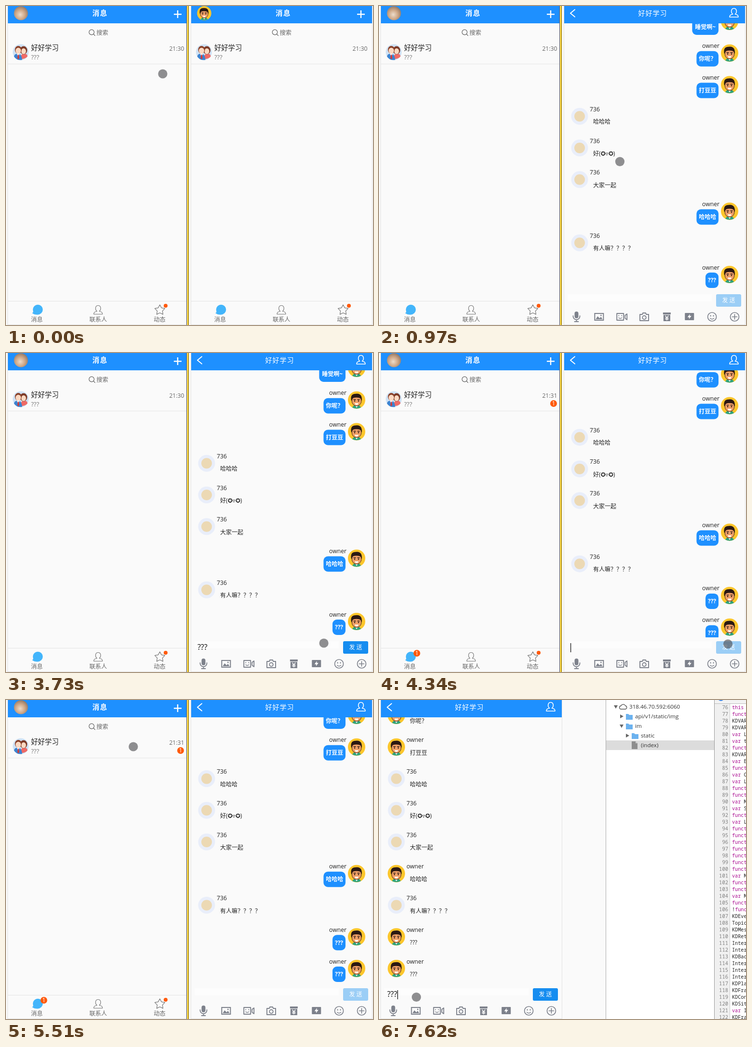
These frames come from a looping animation (761 by 663 pixels, 8 s). An HTML page:

```html
<!DOCTYPE html>
<html lang="zh-CN">
<head>
<meta charset="utf-8">
<title>Chat demo</title>
<style>
html, body { margin: 0; width: 100%; height: 100%; overflow: hidden; background: #fafafa; }
svg { display: block; width: 100vw; height: 100vh; }
text { font-family: 'Open Sans', 'Noto Sans CJK SC', 'Noto Sans CJK', 'DejaVu Sans', sans-serif; white-space: pre; }
.code text { font-family: 'Noto Sans Mono', 'DejaVu Sans Mono', monospace; }
</style>
</head>
<body>
<svg id="stage" viewBox="0 0 761 663"></svg>
<script>
const LOOP = 8000, STEP = 65.75, BLUE = '#1e90ff', GREY = '#7d818b', ALERT = '#ff5a0c';
const $ = id => document.getElementById(id);

// Markup helpers
const text = (x, y, s, size, fill, extra = '') =>
  `<text x="${x}" y="${y}" font-size="${size}" fill="${fill}" ${extra}>${s}</text>`;
const rect = (x, y, w, h, fill, extra = '') =>
  `<rect x="${x}" y="${y}" width="${w}" height="${h}" fill="${fill}" ${extra}/>`;
const disc = (x, y, r, fill, extra = '') => `<circle cx="${x}" cy="${y}" r="${r}" fill="${fill}" ${extra}/>`;
const line = (d, stroke, width = 1, fill = 'none') =>
  `<path d="${d}" stroke="${stroke}" stroke-width="${width}" fill="${fill}" stroke-linecap="round" stroke-linejoin="round"/>`;
const fill = (d, color) => `<path d="${d}" fill="${color}"/>`;
const group = (inner, x = 0, y = 0, extra = '') => `<g transform="translate(${x} ${y})" ${extra}>${inner}</g>`;
const put = (id, x, y, k = 1) => `<use href="#${id}" transform="translate(${x} ${y}) scale(${k})"/>`;
const MID = 'text-anchor="middle"', END = 'text-anchor="end"';

const man = disc(0, 0, 18, '#fdc62c')
  + fill('M-9 15.5Q-6 10 0 10Q6 10 9 15.5Q0 20-9 15.5Z', '#2fa37c')
  + fill('M-4 10L0 16L4 10Z', '#fff')
  + `<ellipse cy="2" rx="9.8" ry="10.3" fill="#f0a068" stroke="#3d2116"/>`
  + fill('M-11 2Q-14-13-2-13Q12-15 11 2L9-3Q2-7-8-4Z', '#2b1913')
  + line('M-6-1h4M2-1h4', '#2b1913', 1.4)
  + disc(-4, 2, 1.3, '#2b1913') + disc(4, 2, 1.3, '#2b1913')
  + fill('M-4 6.5H4Q3 10 0 10T-4 6.5Z', '#fff');

const couple = disc(0, 0, 16.5, '#cfe2f5')
  + fill('M-1 14Q0 3 7 3Q14 3 14 9Q9 15-1 14Z', '#ef6a66')
  + fill('M-14 9Q-13 3-6 3Q2 3 3 16Q-8 18-14 9Z', '#3d83d0')
  + fill('M-8 3H-2L-5 11Z', '#fff') + fill('M-5.8 5h1.8l1 7-2 3-2-3Z', '#d33a35')
  + `<ellipse cx="6" cy="-4" rx="7.5" ry="8.5" fill="#7d3b28"/><ellipse cx="6" cy="-2" rx="5" ry="6" fill="#fcd9c2"/>`
  + `<ellipse cx="-5" cy="-5" rx="7" ry="8" fill="#8a4129"/><ellipse cx="-5" cy="-3" rx="5.5" ry="6.3" fill="#fcd9c2"/>`;

const defs = `<defs>
  <radialGradient id="fur" cx=".45" cy=".6" r=".6"><stop offset="0" stop-color="#ecdccb"/>
  <stop offset=".55" stop-color="#cfa887"/><stop offset="1" stop-color="#937a69"/></radialGradient>
  <clipPath id="view"><rect x="4" y="36" width="375" height="555"/></clipPath>
  <g id="man">${man}</g><g id="couple">${couple}</g>
  <g id="pal">${disc(0, 0, 17.5, '#e9eefa')}${disc(0, 0, 11, '#ecd9b4')}</g>
  <g id="pet">${disc(0, 0, 14.5, 'url(#fur)')}</g></defs>`;

const frame = rect(3.5, -2, 376, 664.5, '#fafafa', 'stroke="#e2e2e2"') + rect(4, 0, 375, 36, BLUE);
const person = (x, y, color, w) => line(
  `M${x - 2.5} ${y + 2}C${x - 7} ${y - 2} ${x - 6} ${y - 10} ${x} ${y - 10}S${x + 7} ${y - 2} ${x + 2.5} ${y + 2}`
  + `C${x + 7} ${y + 3} ${x + 9} ${y + 4} ${x + 9} ${y + 8}H${x - 9}C${x - 9} ${y + 4} ${x - 7} ${y + 3} ${x - 2.5} ${y + 2}`, color, w);

function star(x, y, r) {
  const pts = Array.from({ length: 10 }, (_, i) => {
    const a = i * Math.PI / 5, q = i % 2 ? r * .52 : r;
    return [x + q * Math.sin(a), y - q * Math.cos(a)].map(v => v.toFixed(1)).join(' ');
  });
  return line(`M${pts.join('L')}Z`, '#777', 1.2);
}

function home(id, x, face) {
  const badge = (cx, cy) => disc(cx, cy, 7, ALERT) + text(cx, cy + 4.2, '1', 12, '#fff', MID);
  return group(frame + put(face, 31, 15, face === 'man' ? .82 : 1)
    + text(179, 20, '消息', 14.5, '#fff', 'font-weight="bold" letter-spacing="1.5"')
    + rect(348, 16, 16, 2.4, '#fff') + rect(354.8, 9, 2.4, 16, '#fff')
    + disc(177.5, 54.5, 5.3, 'none', 'stroke="#666" stroke-width="1.2"') + line('M181.5 58.5L184.5 61.5', '#666', 1.2)
    + text(187.5, 59.5, '搜索', 12.3, '#666')
    + put('couple', 30.5, 96) + text(52, 92, '好好学习', 14.3, '#222')
    + text(52, 111, '???', 13, '#777')
    + `<text id="${id}Time" x="369.5" y="93" font-size="12.2" fill="#666" text-anchor="end"></text>`
    + rect(4, 120, 375, 1, '#e5e5e5') + rect(4, 613, 375, 1, '#e3e3e3')
    + disc(66, 631, 10.3, '#43b5fb') + fill('M56 630Q58 637 54 638Q60 643 68 641Z', '#43b5fb')
    + person(191, 632.5, '#777', 1.2) + star(319, 632, 11) + disc(331, 623, 4, ALERT)
    + ['消息', '联系人', '动态'].map((s, i) => text(64 + 127.2 * i, 655.5, s, 12.2, '#666', MID)).join('')
    + `<g id="${id}Badge">${badge(362, 105)}${badge(78.5, 624)}</g>`, x, 0, `id="${id}"`);
}

// Messages: a leading * marks the right phone's own
const messages = ['哈哈', '在干嘛?', '*睡觉啊~', '*你呢？', '*打豆豆', '哈哈哈', '好(✪▿✪)', '大家一起',
  '*哈哈哈', '有人嘛？？？？', '*???', '*???'];
const textWidth = s => [...s].reduce((w, c) => w + ({ '?': 5.8, '~': 9 }[c] || 12), 0);

function message(m, i, mine) {
  const own = m[0] === '*', s = own ? m.slice(1) : m, name = own ? 'owner' : '736';
  const y = 543 + STEP * (i - 10);
  if (own && mine) {
    const w = textWidth(s) + 9.6;
    return put('man', 347, y + 15) + text(326, y + 4.5, name, 12.2, '#222', END)
      + rect(324 - w, y + 11, w, 32, BLUE, 'rx="9"')
      + text(324 - w / 2, y + 31.3, s, 12, '#fff', MID + ' font-weight="bold"');
  }
  return put(own ? 'man' : 'pal', 36, y + 15) + text(57, y + 4.5, name, 12.2, '#222') + text(64, y + 31, s, 12, '#222');
}

const tools = [
  rect(-4, -11, 8, 14, GREY, 'rx="4"') + line('M-7-2v1a7 7 0 0 0 14 0v-1M0 6v4M-4 10h8', GREY, 1.8),
  rect(-9, -7, 18, 14, 'none', `stroke="${GREY}" stroke-width="2"`) + fill('M-7 5L-3-1L1 3L4 0L7 5Z', GREY) + disc(4, -3, 1.4, GREY),
  line('M-10-7H4V7H-10ZM7-3L11-6V6L7 3Z', GREY, 1.9) + line('M-6-3v1M0-3v1M-6 2Q-3 5 0 2', GREY, 1.6),
  line('M-9-5H-4L-3-8H3L4-5H9V8H-9Z', GREY, 1.9) + disc(0, 1.5, 3.8, 'none', `stroke="${GREY}" stroke-width="1.8"`),
  rect(-8, -9, 16, 4, GREY) + rect(-7, -4, 14, 13, GREY) + line('M-3-2L0 2L3-2M0 2V7M-3 2.5H3M-3 5H3', '#fff', 1.3),
  rect(-9.5, -8, 19, 15, GREY, 'rx="1"') + fill('M1-6L-4 1H-.5L-1 5L4-2H.5Z', '#fff'),
  disc(0, 0, 9, 'none', `stroke="${GREY}" stroke-width="1.7"`) + disc(-3, -2, 1.3, GREY) + disc(3, -2, 1.3, GREY) + line('M-4 3Q0 6.5 4 3', GREY, 1.5),
  disc(0, 0, 9, 'none', `stroke="${GREY}" stroke-width="1.7"`) + line('M-5 0H5M0-5V5', GREY, 1.7)
];

function chat(id, x, mine) {
  return group(frame + line('M26 7.5L17 15L26 22.5', '#fff', 2)
    + text(187.5, 20, '好好学习', 14, '#fff', MID + ' letter-spacing="1"') + person(356, 15, '#fff', 1.6)
    + `<g clip-path="url(#view)"><g id="${id}List">${messages.map((m, i) => message(m, i, mine)).join('')}</g></g>`
    + rect(11, 599, 299, 15, '#fdfdfd')
    + `<text id="${id}Input" x="17" y="617" font-size="16" fill="#111"></text>`
    + rect(17, 603, 1.2, 19, '#000', `id="${id}Caret"`)
    + rect(319, 599, 52, 26, '', `rx="3" id="${id}Send"`)
    + text(345, 616.3, '发 送', 12, '#fff', MID)
    + tools.map((s, i) => group(s, 29.5 + 46.85 * i, 646)).join(''), x, 0, `id="${id}"`);
}

function inspector() {
  const rows = ('this,funct,KDVAR,KDVAR,var L,var t,funct,KDVAR,var E,funct,var C,var L,funct,funct,var M,var S,funct,var L,'
    + 'funct,'.repeat(7) + 'var M,funct,funct,var M,funct,!func,KDEve,Topic,KDMes,KDRet,Inter,Inter,KDBac,Inter,Inter,Inter,'
    + 'KDPla,KDFra,KDCon,KDSit,var I,KDFra').split(',');
  const paint = s => s.replace(/this|funct?|var/, k => `<tspan fill="#aa0d91">${k}</tspan>`);
  const code = rows.map((s, i) => {
    const y = 19 + 14 * i;
    return text(724, y, 76 + i, 10.5, '#808080', END) + text(732, y, paint(s), 10.2, '#222');
  }).join('');
  const open = (x, y) => fill(`M${x - 4} ${y - 3}h8l-4 7Z`, '#666');
  const shut = (x, y) => fill(`M${x - 3} ${y - 4}v8l7-4Z`, '#666');
  const folder = (x, y) => fill(`M${x - 7} ${y - 6}h5l2 2h7v10h-14Z`, '#6cb2ef');
  const label = (x, y, s) => text(x, y + 4.3, s, 11.6, '#333');
  return `<g id="dev">` + rect(380, 0, 381, 663, '#fafafa') + rect(470, 0, 226, 663, '#fff')
    + rect(471, 84, 224, 20, '#dcdcdc') + rect(470, 0, 1, 663, '#aaa')
    + open(491, 14) + line('M501 19H511A3.6 3.6 0 0 0 511 12A5 5 0 0 0 502 12A3.6 3.6 0 0 0 501 19Z', '#555', 1.3)
    + label(519, 14, '318.46.70.592:6060')
    + shut(503, 34) + folder(519, 35) + label(531, 34, 'api/v1/static/img')
    + open(503, 54) + folder(519, 55) + label(531, 54, 'im')
    + shut(515, 74) + folder(531, 75) + label(543, 74, 'static')
    + fill('M524 86H532L536 90V102H524Z', '#8e8e8e') + fill('M532 86V90H536Z', '#ccc') + label(543, 94, '(index)')
    + rect(696, 0, 65, 663, '#fff') + rect(696, 8, 31, 655, '#f0f0f0') + rect(727, 8, 1, 655, '#ccc')
    + `<g class="code">${code}</g>` + rect(696, 0, 65, 7, '#f3f3f3') + rect(696, 7, 65, 1, '#bbb')
    + fill('M704 0H714Q709 4 704 0Z', '#2f7fe8') + rect(695, 0, 1, 663, '#999') + '</g>';
}

const divider = `<g id="divider">` + rect(374, 0, 6, 663, '#f3e27a') + rect(374, 0, 1, 663, '#4a4a55')
  + rect(375, 0, 1, 663, '#e9e2bf') + rect(376, 0, 2, 663, '#ffd21c') + rect(378, 0, 1, 663, '#75600d')
  + rect(379, 0, 1, 663, '#fafafa') + '</g>';

$('stage').innerHTML = defs + rect(0, 0, 761, 663, '#fafafa')
  + home('homeR', 380, 'man') + chat('chatR', 380, true) + home('homeL', 0, 'pet') + divider
  + inspector() + chat('chatL', 0, false) + disc(0, 0, 9.6, '#4c4c4f', 'fill-opacity=".62" id="touch"');

// Timeline: [ms, values...]
const path = [[0, 325, 141], [60, 325, 141], [260, 430, 118], [480, 516, 95], [745, 516, 95], [890, 506, 190],
  [1150, 485, 618], [1310, 479, 605], [1530, 476.5, 607.5], [3570, 476.5, 607.5], [3650, 580, 592], [3730, 659, 603],
  [3800, 664, 603], [4020, 733, 606], [4160, 724, 605], [4900, 722, 604], [5180, 540, 380], [5480, 264, 97],
  [5800, 264, 97], [5950, 206, 560], [6060, 177, 618], [6130, 177, 618], [6360, 77.5, 617.5]];
const scrollR = [[600, 190], [660, 155], [745, 155], [970, 0], [4160, 0], [4380, -STEP]];
const scrollL = [[5640, 80], [5980, -STEP]];

function track(keys, t) {
  const i = keys.findIndex(k => k[0] > t);
  if (i === 0) return keys[0].slice(1);
  if (i < 0) return keys[keys.length - 1].slice(1);
  const a = keys[i - 1], b = keys[i], p = (t - a[0]) / (b[0] - a[0]);
  return a.slice(1).map((v, j) => v + (b[j + 1] - v) * p);
}
const within = (t, ...spans) => spans.some(([a, b]) => t >= a && t < b);
const show = (id, on) => $(id).setAttribute('display', on ? 'inline' : 'none');

function updateChat(id, scroll, count, caret) {
  $(id + 'List').setAttribute('transform', `translate(0 ${scroll})`);
  $(id + 'Input').textContent = '?'.repeat(count);
  $(id + 'Caret').setAttribute('x', 17 + 7 * count);
  show(id + 'Caret', caret);
  $(id + 'Send').setAttribute('fill', count ? '#168df0' : '#9bcef6');
}

function render(t) {
  const typed = (...times) => times.filter(at => t >= at).length;
  const received = t >= 4240;
  show('homeR', t < 600);
  show('chatR', t >= 600 && t < 5560);
  show('homeL', t < 5640);
  show('chatL', t >= 5640);
  show('divider', t < 5560);
  show('dev', t >= 5560);
  show('homeLBadge', received);
  show('homeRBadge', false);
  $('homeLTime').textContent = received ? '21:31' : '21:30';
  $('homeRTime').textContent = '21:30';
  updateChat('chatR', track(scrollR, t)[0], t < 4160 ? typed(2610, 2850, 2910) : 0,
    within(t, [1840, 2300], [2610, 3430], [3950, 4100], [4160, 4760], [5280, 5480]));
  updateChat('chatL', track(scrollL, t)[0], typed(7260, 7420, 7560), within(t, [6650, 7120], [7260, LOOP]));
  const [x, y] = track(path, t);
  $('touch').setAttribute('transform', `translate(${x} ${y})`);
  show('touch', !within(t, [2650, 3050], [7120, 7610]));
}

const start = performance.now();
function tick() {
  render((performance.now() - start) % LOOP);
  requestAnimationFrame(tick);
}
tick();
</script>
</body>
</html>
```
